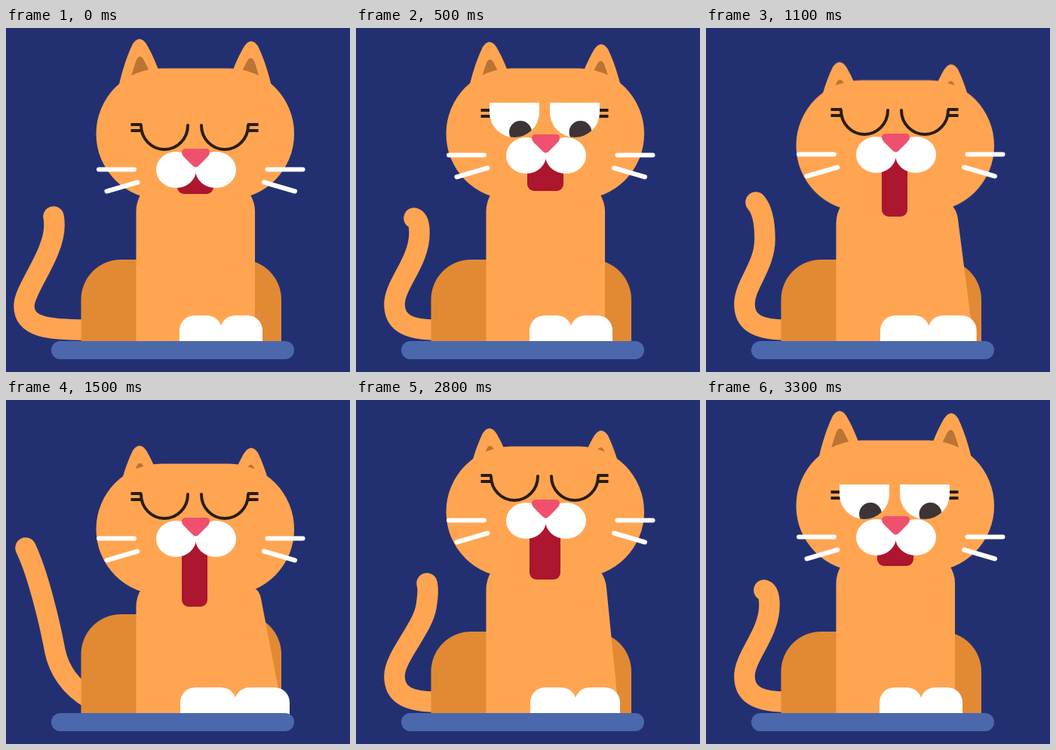
These frames come from a looping animation (456x456 px, 3400 ms). An HTML page without scripts:

```html
<!DOCTYPE html>
<html lang="en">
<head>
<meta charset="utf-8">
<title>Yawning cat</title>
<style>
  html, body { margin: 0; width: 100%; height: 100%; overflow: hidden; background: #223072; }
  svg { display: block; width: 100%; height: 100%; }

  .fur { fill: #ffa552; }
  .shade { fill: #e28934; }
  .inner { fill: #ba7433; }
  .white { fill: #fff; }
  .line { fill: none; stroke: #2a1d10; stroke-width: 4; }
  .whiskers { fill: none; stroke: #fff; stroke-width: 6; stroke-linecap: round; }
  .tail { fill: none; stroke: #ffa552; stroke-width: 27.5; stroke-linecap: round; }

  /* Poses hold until the next one; steps(n) fills in evenly between two. */
  .anim { animation: 3.4s step-end infinite; }
  .head { animation-name: head; }
  .ears { animation-name: ears; }
  .face { animation-name: face; }
  .lid { animation-name: lid; }
  .lash { animation-name: lash; }
  .open { animation-name: open; }
  .shut { animation-name: shut; }
  .arc { animation-name: arc; stroke-linecap: round; }
  .mouth { animation-name: mouth; }
  .back { animation-name: back; }
  .body { animation-name: body; }
  .paw-l { animation-name: paw-l; }
  .paw-r { animation-name: paw-r; }
  .tail { animation-name: tail; }

  @keyframes head {
    0%, 85.294% { transform: translateY(0); }
    26.47% { transform: translateY(8px); animation-timing-function: steps(3); }
    44.117% { transform: translateY(31px); }
    73.529% { transform: translateY(23.3px); }
    79.411% { transform: translateY(15.7px); }
    82.352% { transform: translateY(8px); }
  }
  @keyframes ears {
    0%, 97.058% { transform: translateY(0); }
    14.705%, 94.117% { transform: translateY(4px); }
    17.647%, 91.176% { transform: translateY(8px); }
    20.588%, 88.235% { transform: translateY(10px); }
    23.529%, 85.294% { transform: translateY(12px); }
    26.47%, 82.352% { transform: translateY(15px); }
  }
  @keyframes face {
    0% { transform: translateY(0); }
    11.764%, 97.058% { transform: translateY(-6px); }
    14.705%, 94.117% { transform: translateY(-19px); }
    17.647%, 85.294% { transform: translateY(-32px); }
    26.47% { transform: translateY(-28px); animation-timing-function: steps(3); }
    44.117% { transform: translateY(-4px); }
    73.529% { transform: translateY(-12px); }
    79.411% { transform: translateY(-20px); }
    82.352% { transform: translateY(-28px); }
  }
  @keyframes lid {
    0%, 97.058% { d: path("M176 100L244 100L244 118Q210 118 176 118Z"); }
    14.705%, 94.117% { d: path("M176 100L244 100L244 121Q210 121 176 121Z"); }
    17.647%, 91.176% { d: path("M176 100L244 100L244 125Q210 125 176 125Z"); }
    20.588%, 88.235% { d: path("M176 100L244 100L244 128Q210 142 176 128Z"); }
    23.529%, 85.294% { d: path("M176 100L244 100L244 131Q210 160 176 131Z"); }
  }
  @keyframes lash {
    0%, 91.176% { transform: translateY(0); }
    20.588%, 88.235% { transform: translateY(3px); }
    23.529% { transform: translateY(6px); }
  }
  @keyframes open {
    0%, 26.47% { opacity: 0; }
    5.882%, 85.294% { opacity: 1; }
  }
  @keyframes shut {
    0%, 26.47% { opacity: 1; }
    5.882%, 85.294% { opacity: 0; }
  }
  @keyframes arc {
    0%, 85.294% { d: path("M179 129A31 32 0 0 0 241 129"); }
    26.47% { d: path("M179 133A31 27 0 0 0 241 133"); }
  }
  @keyframes mouth {
    0% { x: 227px; width: 48px; height: 35px; }
    11.764%, 97.058% { x: 227px; width: 48px; height: 41px; }
    14.705%, 94.117% { x: 227px; width: 48px; height: 50px; }
    17.647%, 91.176% { x: 227px; width: 48px; height: 59px; }
    20.588%, 88.235% { x: 227px; width: 48px; height: 67px; }
    23.529%, 85.294% { x: 227px; width: 48px; height: 75px; }
    26.47%, 82.352% { x: 230px; width: 41px; height: 81px; }
    32.352%, 79.411% { x: 233px; width: 34px; height: 85px; }
    38.235%, 73.529% { x: 233px; width: 34px; height: 89px; }
    44.117% { x: 233px; width: 34px; height: 93px; }
  }
  @keyframes back {
    0%, 79.411% { transform: translateY(0); }
    38.235%, 73.529% { transform: translateY(-12px); }
    44.117% { transform: translateY(-23px); }
  }
  @keyframes body {
    0%, 85.294% { d: path("M172.5 430L172.5 243Q172.5 230 180 218L322 218Q330 230 330 243L330 430Z"); }
    26.47% {
      d: path("M172.5 430L172.5 251Q172.5 238 180 226L323 226Q331 236 332 249L350 430Z");
      animation-timing-function: steps(3);
    }
    44.117% { d: path("M172.5 430L172.5 274Q172.5 261 180 249L328 249Q336 252 338 263L370 430Z"); }
    73.529% { d: path("M172.5 430L172.5 266Q172.5 253 180 241L326 241Q334 246 336 258L364 430Z"); }
    79.411% { d: path("M172.5 430L172.5 259Q172.5 246 180 234L325 234Q333 241 334 254L357 430Z"); }
    82.352% { d: path("M172.5 430L172.5 251Q172.5 238 180 226L323 226Q331 236 332 249L350 430Z"); }
  }
  @keyframes paw-l {
    0%, 85.294% { x: 230px; width: 56px; }
    26.47% { x: 231px; width: 61px; animation-timing-function: steps(3); }
    44.117% { x: 231px; width: 74px; }
    73.529% { x: 231px; width: 69.5px; }
    79.411% { x: 231px; width: 65px; }
    82.352% { x: 231px; width: 61px; }
  }
  @keyframes paw-r {
    0%, 85.294% { x: 284px; width: 56px; }
    26.47% { x: 290px; width: 60px; animation-timing-function: steps(3); }
    44.117% { x: 303px; width: 73px; }
    73.529% { x: 299px; width: 69px; }
    79.411% { x: 295px; width: 64px; }
    82.352% { x: 290px; width: 60px; }
  }
  @keyframes tail {
    0% {
      d: path("M105 400C60 400 24 398 24 368C24 346 64 300 64 262C64 258 64 254 63 250");
      animation-timing-function: steps(3);
    }
    8.823% {
      d: path("M105 400C66 400 40 394 40 366C40 342 69 312 69 278C69 266 64 258 56 257");
      animation-timing-function: steps(2);
    }
    14.705% {
      d: path("M105 400C72 400 51 392 51 366C51 340 84 310 84 272C84 260 82 254 77 252");
      animation-timing-function: steps(3);
    }
    23.529% { d: path("M105 400C72 400 51 394 51 366C51 340 84 288 102 268C108 261 113 257 117 255"); }
    26.47%, 82.352% { d: path("M105 400C72 400 51 392 51 366C51 340 88 304 93 274C95 262 96 250 94 243"); }
    32.352%, 79.411% { d: path("M105 400C72 400 51 392 51 366C51 340 78 316 78 280C78 256 74 240 66 231"); }
    38.235%, 73.529% { d: path("M107 398C76 392 58 380 58 352C59 330 67 315 66 282C65 256 57 232 45 218"); }
    44.117% { d: path("M112 396C84 380 70 356 65 333C57 290 43 237 32 210C30 205 28 200 26 196"); }
    85.294% {
      d: path("M105 400C72 400 51 394 51 366C51 340 84 288 102 268C108 261 113 257 117 255");
      animation-timing-function: steps(2);
    }
    91.176%, 97.058% { d: path("M105 400C72 400 51 392 51 366C51 340 84 310 84 272C84 260 82 254 77 252"); }
    94.117% { d: path("M105 400C72 400 51 392 51 366C51 340 80 311 80 275C80 264 78 257 72 255"); }
  }
</style>
</head>
<body>
<svg viewBox="0 0 456 456">
  <defs>
    <path id="eye" d="M177 118H243V131A33 33 0 0 1 177 131Z"/>
    <path id="lid" class="fur anim lid" d="M176 100L244 100L244 118Q210 118 176 118Z"/>
    <path id="arc" class="line anim arc" d="M179 129A31 32 0 0 0 241 129"/>
    <path id="lash" class="line anim lash" d="M165.5 128H180M165.5 136H180"/>
    <path id="whisker" class="whiskers" d="M123 187.500H170M133.500 216.500L174.500 204.500"/>
    <clipPath id="sockets">
      <use href="#eye"/>
      <use href="#eye" transform="matrix(-1 0 0 1 500 0)"/>
    </clipPath>
  </defs>

  <path class="anim tail" d="M105 400C60 400 24 398 24 368C24 346 64 300 64 262C64 258 64 254 63 250"/>
  <path class="shade anim back" d="M99.500 438V360A53 53 0 0 1 152.500 307H312A53 53 0 0 1 365 360V438Z"/>
  <path class="fur anim body" d="M172.5 430L172.5 243Q172.5 230 180 218L322 218Q330 230 330 243L330 430Z"/>

  <g class="anim head">
    <g class="anim ears">
      <path class="fur" d="M147 90C151 66 158 42 168 21Q177 8 186 21C192 31 198 44 206 66Z"/>
      <path class="inner" d="M164 72C167 60 170 50 173 42Q177 34 182 41L194 65Z"/>
      <path class="fur" d="M355 93C351 69 344 45 334 24Q325 11 316 24C310 34 304 46 297 66Z"/>
      <path class="inner" d="M338 74C335 62 332 52 329 44Q325 36 320 43L308 67Z"/>
    </g>
    <rect class="fur" x="119.500" y="53.500" width="262.500" height="173.500" rx="86.500"/>
  </g>

  <g class="anim face">
    <use href="#lash"/>
    <use href="#lash" transform="matrix(-1 0 0 1 500 0)"/>
    <g class="anim open">
      <g class="white">
        <use href="#eye"/>
        <use href="#eye" transform="matrix(-1 0 0 1 500 0)"/>
      </g>
      <g fill="#3e3435" clip-path="url(#sockets)">
        <circle cx="218" cy="157" r="15"/>
        <circle cx="297.500" cy="157" r="15"/>
      </g>
      <use href="#lid"/>
      <use href="#lid" transform="matrix(-1 0 0 1 500 0)"/>
    </g>
    <g class="anim shut">
      <use href="#arc"/>
      <use href="#arc" transform="matrix(-1 0 0 1 500 0)"/>
    </g>

    <use href="#whisker"/>
    <use href="#whisker" transform="matrix(-1 0 0 1 516.500 0)"/>

    <rect class="anim mouth" x="227" y="185" width="48" height="35" rx="9" fill="#ac162f"/>
    <ellipse class="white" cx="225.500" cy="188" rx="26.500" ry="24"/>
    <ellipse class="white" cx="278" cy="188" rx="27" ry="24"/>
    <path fill="#ef506d" d="M239 160H265Q270 160 270 165Q270 168 267.500 170.500L256 182Q251.500 187 247 182L235.500 170.500Q233 168 233 165Q233 160 239 160Z"/>
  </g>

  <rect class="white anim paw-l" x="230" y="381" width="56" height="56" rx="20"/>
  <rect class="white anim paw-r" x="284" y="381" width="56" height="56" rx="20"/>
  <rect x="60" y="415" width="322" height="24" rx="12" fill="#4b68ad"/>
</svg>
</body>
</html>
```
